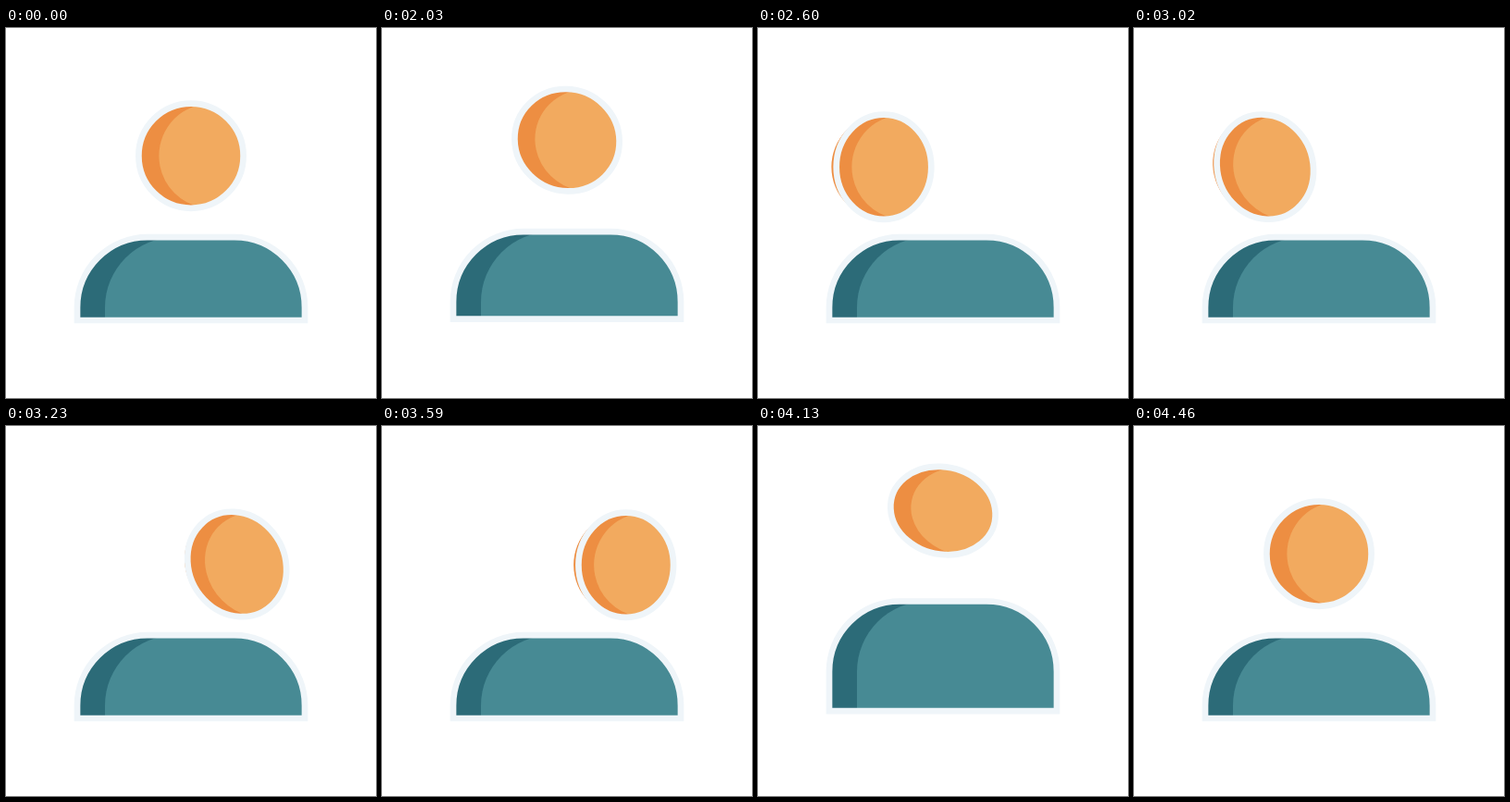
Animation of 400x400 px, one loop 4.55 s. Source, as an HTML page with a canvas:

```html
<!DOCTYPE html>
<html lang="en">
<head>
<meta charset="utf-8">
<title>Person icon</title>
<style>
  html, body { margin: 0; height: 100%; overflow: hidden; background: #fff; }
  canvas { display: block; }
</style>
</head>
<body>
<canvas id="stage" width="400" height="400"></canvas>
<script>
const ctx = document.getElementById('stage').getContext('2d');
const LOOP = 4550, START = 2030, STEP = 30;
const OUTLINE = '#eff5f9';

const progress = (t, a, b) => Math.min(1, Math.max(0, (t - a) / (b - a)));
const easeOut = (t, a, b, power) => 1 - (1 - progress(t, a, b)) ** power;
const easeInOut = (t, a, b) => {
  const u = progress(t, a, b);
  return u < 0.5 ? 4 * u ** 3 : 1 - 4 * (1 - u) ** 3;
};
const bump = p => p * (1 - p);

function outline() {
  ctx.lineWidth = 6.7;
  ctx.strokeStyle = OUTLINE;
  ctx.stroke();
}

function bodyPath(left, top, bottom) {
  const right = 323, r = 76;
  ctx.beginPath();
  ctx.moveTo(left, bottom);
  ctx.arcTo(left, top, left + r, top, r);
  ctx.arcTo(right, top, right, top + r, r);
  ctx.lineTo(right, bottom);
  ctx.closePath();
}

function drawBody(lift) {
  const top = 226.2 - 37 * lift, bottom = 316 - 8 * lift;
  bodyPath(77, top, bottom);
  ctx.fillStyle = '#2c6b78';
  ctx.fill();
  bodyPath(107, top, bottom);
  ctx.fillStyle = '#478a94';
  ctx.fill();
  bodyPath(77, top, bottom);
  outline();
}

function drawHead({ x, y, rx, ry, tilt }) {
  const r = 56.6, shift = 22, a = Math.acos(shift / 2 / r);
  const trace = (scaleX, path) => {
    ctx.save();
    ctx.transform(scaleX, tilt, tilt, ry / r, x, y);
    ctx.beginPath();
    path();
    ctx.restore();
  };
  const ball = () => ctx.arc(0, 0, r, 0, 2 * Math.PI);

  trace(rx / r, ball);
  ctx.fillStyle = '#f2aa5f';
  ctx.fill();

  // The shade keeps its width, so it peeks out when the head narrows.
  trace(1, () => {
    ctx.arc(0, 0, r, a, 2 * Math.PI - a);
    ctx.arc(shift, 0, r, Math.PI + a, Math.PI - a, true);
  });
  ctx.fillStyle = '#ed8e42';
  ctx.fill();

  trace(rx / r, ball);
  outline();
}

function draw(t) {
  const toLeft = easeInOut(t, 2280, 2590);
  const toRight = easeInOut(t, 2920, 3365);
  const toCenter = easeInOut(t, 3545, 3998);
  const rise = easeInOut(t, 3750, 4085);
  const fall = easeInOut(t, 4085, 4450);
  const jump = easeOut(t, 1995, 2270, 3.3);

  const side = -toLeft + 2 * toRight - toCenter;
  const lift = jump - toLeft + rise - fall;
  const bodyLift = easeOut(t, 1995, 2270, 1.3) - toLeft
    + easeInOut(t, 3810, 4085) - fall;
  const drop = 1 - (1 - side * side) ** 3;

  ctx.clearRect(0, 0, 400, 400);
  drawBody(bodyLift);
  drawHead({
    x: 200 + 64 * side,
    y: 138.2 + 12 * drop - 47 * lift,
    rx: 56.6 - 5.3 * side * side + 10 * bump(rise),
    ry: 56.6 - 9 * lift + 8 * bump(jump) + 41 * bump(rise),
    tilt: 0.04 * lift + 0.16 * Math.sqrt(bump(toRight)) + 0.2 * Math.sqrt(bump(rise))
  });
}

function tick() {
  const t = performance.now() % LOOP;
  draw(t < START ? 0 : START + Math.floor((t - START) / STEP) * STEP);
  requestAnimationFrame(tick);
}
tick();
</script>
</body>
</html>
```
